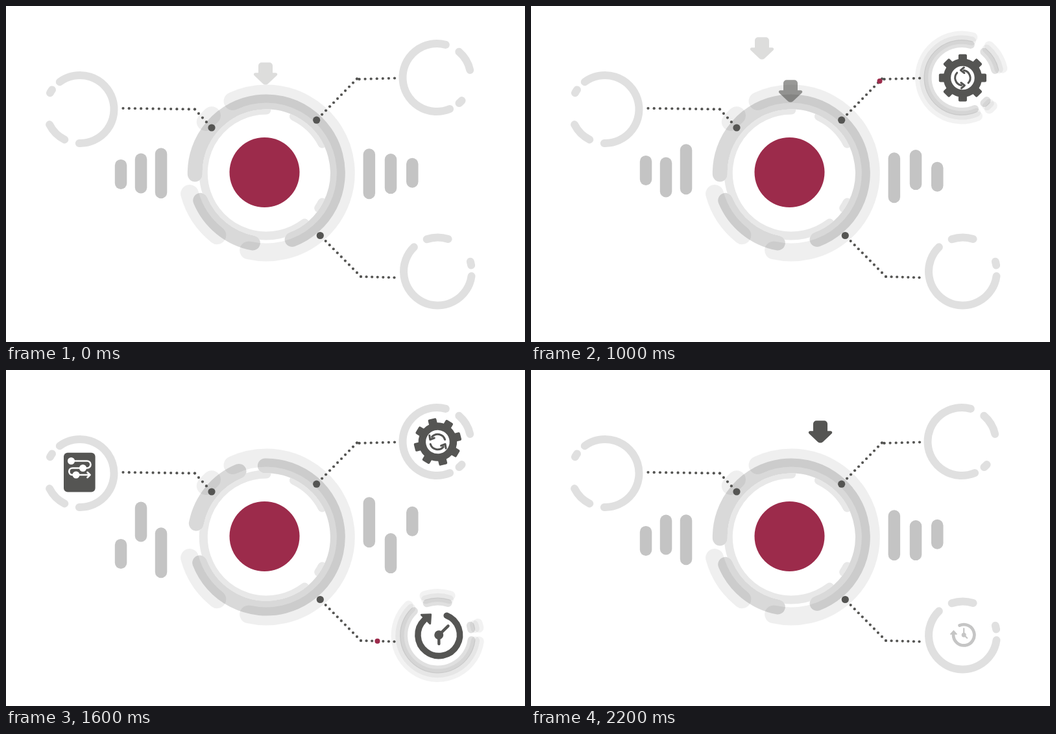
An HTML page that plays this animation: 800 px wide and 519 px high, repeating every 2.3 s.

```html
<!DOCTYPE html>
<html lang="en">
<head>
<meta charset="utf-8">
<title>Process hub</title>
<style>
  html, body { margin: 0; width: 100%; height: 100%; overflow: hidden; background: #fff; }
  svg { display: block; width: 100vw; height: 100vh; }
</style>
</head>
<body>
<svg id="stage" viewBox="0 0 800 519"></svg>
<script>
const STEP = 100, STEPS = 23;
const DARK = '#555553', RED = '#9c2b4b';
const stage = document.getElementById('stage');

const clamp = x => Math.min(1, Math.max(0, x));
const ramp = (k, from, to) => clamp((k - from) / (to - from));
const smooth = u => u * u * (3 - 2 * u);
// Rises from a to b, then falls from c to d.
const bump = (k, a, b, c, d) => Math.min(ramp(k, a, b), 1 - ramp(k, c, d));

function set(node, attrs) {
  for (const name in attrs) node.setAttribute(name, attrs[name]);
}

function add(parent, tag, attrs = {}) {
  const node = document.createElementNS('http://www.w3.org/2000/svg', tag);
  set(node, attrs);
  return parent.appendChild(node);
}

function dot(parent, cx, cy, r, fill) {
  return add(parent, 'circle', { cx, cy, r, fill });
}

function stroke(parent, d, width, color, attrs = {}) {
  return add(parent, 'path', {
    d, fill: 'none', stroke: color, 'stroke-width': width,
    'stroke-linecap': 'round', 'stroke-linejoin': 'round', ...attrs
  });
}

// Arc around the local origin, clockwise from a to b degrees.
function arc(r, a, b) {
  const at = deg => {
    const rad = deg * Math.PI / 180;
    return (r * Math.cos(rad)).toFixed(2) + ' ' + (r * Math.sin(rad)).toFixed(2);
  };
  return `M${at(a)}A${r} ${r} 0 ${b - a > 180 ? 1 : 0} 1 ${at(b)}`;
}

// Every broken ring is one of two patterns, turned to its own start angle.
const LONG_SHORT_PILL = [[0, 217.8], [243.3, 279.8], [335.2, 341.5]];
const LONG_MEDIUM = [[0, 249.8], [282, 338.4]];

function ring(parent, r, width, start, alpha, pattern = LONG_SHORT_PILL) {
  const d = pattern.map(([a, b]) => arc(r, start + a, start + b)).join('');
  return stroke(parent, d, width, '#000', { 'stroke-opacity': alpha });
}

function place(node, x, y, turn = 0, scale = 1) {
  set(node, { transform: `translate(${x} ${y}) rotate(${turn}) scale(${scale})` });
}

function show(node, opacity) { set(node, { opacity }); }

// Equalizer bars, growing toward the hub on both sides
const bars = [];
for (let i = 0; i < 3; i++) {
  const height = 46 + 16 * i, flip = i === 1 ? -1 : 1;
  for (const [x, dir] of [[167.8 + 31 * i, flip], [617 - 33.2 * i, -flip]]) {
    const node = add(stage, 'rect', { x, height, width: 18.5, rx: 9.2, fill: '#c4c4c4' });
    bars.push({ node, dir, top: 258.8 - height / 2 + dir * (2.6 - .8 * i) });
  }
}

// Central rings
const hub = add(stage, 'g');
place(hub, 401.3, 258);
const outerRing = ring(hub, 122.5, 28, 245, .063);
const middleRing = ring(hub, 110, 23, 179, .148, LONG_MEDIUM);
const innerRing = ring(hub, 97, 13, 52.5, 1);
innerRing.setAttribute('stroke', '#e8e8e8');
innerRing.style.mixBlendMode = 'darken';

// Central emblem
const halo = dot(stage, 398.5, 257, 57.5, RED);
show(halo, .7);
dot(stage, 398.5, 257, 54, RED);

// Icons
const doc = add(stage, 'g');
add(doc, 'rect', { x: 89, y: 127.8, width: 48.6, height: 60.8, rx: 6, fill: DARK });
stroke(doc, 'M100.5 140.5H125a5.5 5.5 0 0 1 0 11H102.5a5.25 5.25 0 0 0 0 10.5H129M125.5 158l4 4-4 4', 2.7, '#fff');
for (const [x, y] of [[100.5, 140.5], [118.5, 151.5], [108, 162]]) dot(doc, x, y, 5.5, '#fff');

const gear = add(stage, 'g');
add(gear, 'circle', { r: 24, fill: 'none', stroke: DARK, 'stroke-width': 11.4 });
for (let a = 0; a < 360; a += 45) {
  add(gear, 'rect', {
    x: -6.5, y: -36.6, width: 13, height: 11, rx: 2, fill: DARK, transform: `rotate(${a})`
  });
}
for (const turn of [0, 180]) {
  const half = add(gear, 'g', { transform: `rotate(${turn})` });
  stroke(half, arc(11.7, -80, 42), 3, DARK);
  stroke(half, 'M2 -16L-3 -11.8L2.5 -7.5', 3, DARK);
}

const clock = add(stage, 'g');
stroke(clock, arc(32.3, 246, 540), 9.6, DARK);
stroke(clock, 'M-41 -2.5L-31.5 -13L-22 -2.5Z', 3, DARK, { fill: DARK });
stroke(clock, 'M0 -20V0L10 9.5', 4.4, DARK);
dot(clock, 0, 0, 7, DARK);

// Routes run from a satellite to its node on the hub.
const SPEED = 27.4, NODE_GAP = 12, DOT_GAP = 8.9;

function along(points, distance) {
  for (let i = 1; i < points.length; i++) {
    const [x0, y0] = points[i - 1], [x1, y1] = points[i];
    const length = Math.hypot(x1 - x0, y1 - y0);
    if (distance <= length || i === points.length - 1) {
      const u = clamp(distance / length);
      return [x0 + (x1 - x0) * u, y0 + (y1 - y0) * u];
    }
    distance -= length;
  }
}

function routeLength(points) {
  return points.slice(1).reduce((sum, [x, y], i) => sum + Math.hypot(x - points[i][0], y - points[i][1]), 0);
}

function dottedRoute(points, length) {
  const stops = [...points.slice(0, -1), along(points, length - NODE_GAP)];
  for (let i = 1; i < stops.length; i++) {
    const leg = [stops[i - 1], stops[i]], size = routeLength(leg);
    const count = Math.max(1, Math.round(size / DOT_GAP));
    for (let n = 0; n <= count; n++) dot(stage, ...along(leg, size * n / count), 2.1, DARK);
  }
}

const satellites = [
  { x: 114, y: 159.5, start: 233.5, route: [[180.5, 158], [291, 159.5], [317, 188]] },
  { x: 664, y: 110.5, start: 67.5, route: [[599, 111.5], [544.5, 113], [541, 112.5], [478.7, 176.2]] },
  { x: 665.5, y: 410, start: 8, route: [[598.5, 419.5], [547, 418], [484.3, 354.5]] }
].map((s, i) => {
  const body = add(stage, 'g');
  place(body, s.x, s.y);
  const echoes = [1.115, 1.23].map(scale => {
    const echo = ring(body, 52.5, 12, s.start, .05);
    place(echo, 0, 0, 0, scale);
    return echo;
  });
  ring(body, 52.5, 12, s.start, .12);
  const length = routeLength(s.route);
  dottedRoute(s.route, length);
  return {
    route: s.route, length, echoes, depart: .35 + 7.35 * i,
    end: dot(stage, ...s.route.at(-1), 5.6, DARK),
    runner: dot(stage, 0, 0, 4, RED)
  };
});

// Falling arrows, each landing one step after the previous
const ARROW = 'M12 0H24a5 5 0 0 1 5 5V16H34a2.3 2.3 0 0 1 1.5 4L22 32.7a6 6 0 0 1-8 0' +
  'L.6 20A2.3 2.3 0 0 1 2 16H7V5a5 5 0 0 1 5-5z';
const arrows = [[382, 87.3], [338, 48.3], [428, 26.3]].map(([x, top], i) => ({
  x, top, start: 9 + i, node: add(stage, 'path', { d: ARROW, fill: DARK })
}));

function drawBars(k) {
  const phase = Math.max(k, .8 + .84 * k);
  const wave = 1 - 2 * Math.abs(((phase + 16) % 22) / 11 - 1);
  for (const b of bars) set(b.node, { y: b.top + 27.5 * wave * b.dir });
}

function drawHub(k) {
  place(outerRing, 0, 0, 360 * ramp(k, 0, 8));
  place(middleRing, 0, 0, -360 * ramp(k, 10, 18));
  show(innerRing, k >= 19 && k <= 21 ? 0 : 1);
  show(halo, k % 9 === 3 && k > 9 ? .7 : 0);
}

function drawSatellite(s, k) {
  const age = k - s.depart, distance = age * SPEED;
  const active = age > 0 && age < 5.7;
  show(s.echoes[0], active ? 1 : 0);
  show(s.echoes[1], active && age > .9 ? 1 : 0);

  const arrived = Math.abs(distance - s.length) < NODE_GAP;
  set(s.end, { r: arrived ? 7.5 : 5.6, fill: arrived ? RED : DARK });
  const [cx, cy] = along(s.route, distance);
  set(s.runner, { cx, cy });
  show(s.runner, active && !arrived ? 1 : 0);
}

function drawIcons(k) {
  const visit = k % 12;
  show(doc, bump(visit, 0, 3, 6, 10));
  place(doc, 0, 18 * Math.max(0, visit - 6));

  show(gear, bump(k, 6, 9, 17, 19));
  place(gear, 665.4, 111, 40.3 * Math.max(0, k - 13));

  const presence = bump(k, 11, 14, 20, 23);
  show(clock, presence);
  place(clock, 667.2, 409.3, 360 * smooth(ramp(k, 14.85, 20)), .25 + .75 * presence);
}

function drawArrows(k) {
  for (const a of arrows) {
    const age = (k - a.start) % 9;
    show(a.node, age >= 0 && age < 3 ? .2 + .4 * age : 0);
    place(a.node, a.x, a.top + 28 * age - age * age);
  }
}

function draw(ms) {
  const k = Math.floor(ms / STEP) % STEPS;
  drawBars(k);
  drawHub(k);
  satellites.forEach(s => drawSatellite(s, k));
  drawIcons(k);
  drawArrows(k);
}

let origin;
function tick(now) {
  origin ??= now;
  draw(now - origin);
  requestAnimationFrame(tick);
}
draw(0);
requestAnimationFrame(tick);
</script>
</body>
</html>
```
